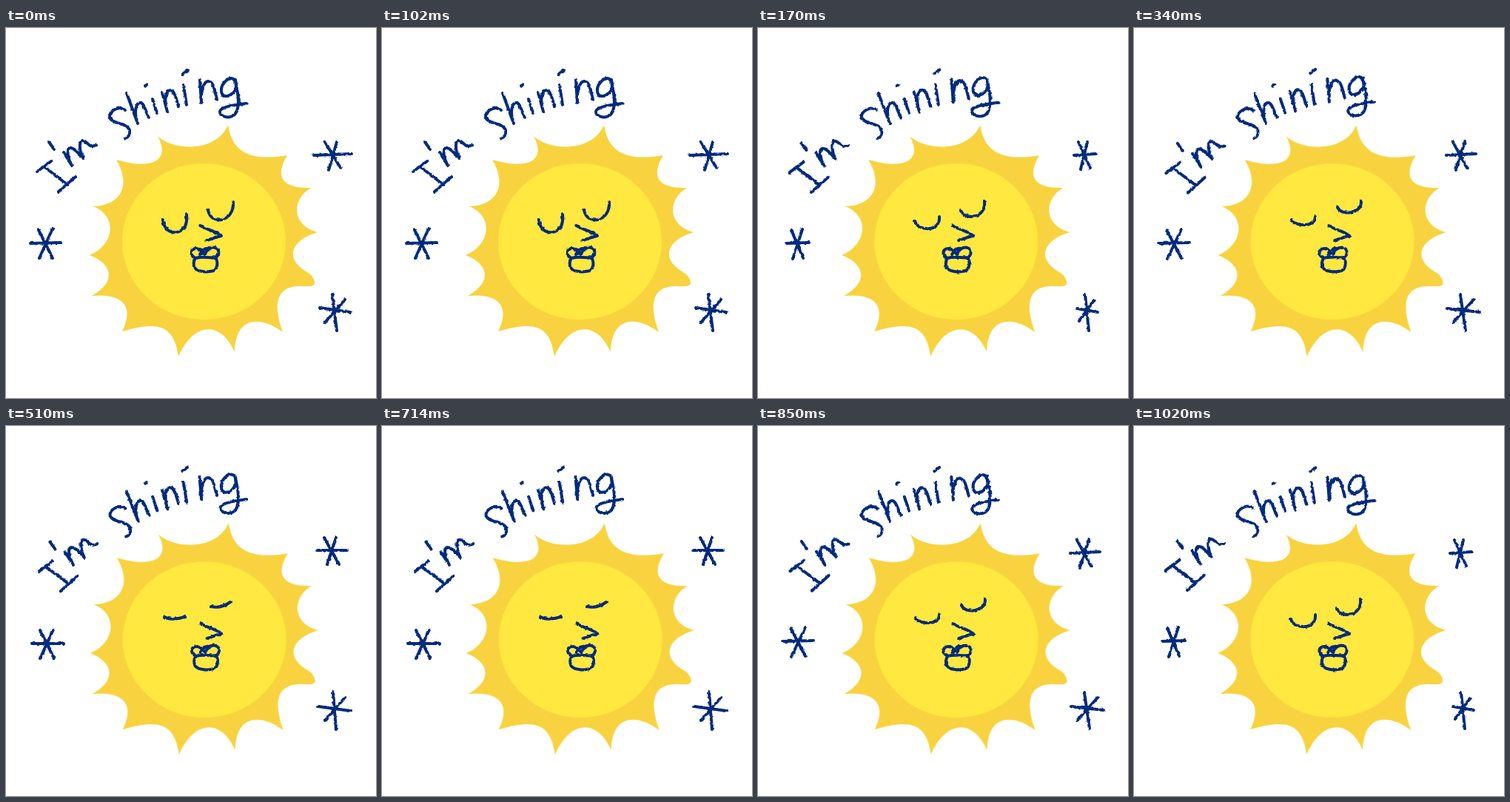
An HTML page that plays this animation: 500x500 px, repeating every 1.12 s.

```html
<!DOCTYPE html>
<html lang="en">
<head>
<meta charset="utf-8">
<title>I'm shining</title>
<style>
  html, body { margin: 0; width: 100%; height: 100%; overflow: hidden; background: #fff; }
  svg { display: block; width: 100vw; height: 100vh; }
  .ink { fill: none; stroke: #04297b; stroke-width: 4; stroke-linecap: round; stroke-linejoin: round; }
  .pose { visibility: hidden; animation: 1120ms step-end infinite; }
  #open { animation-name: open; }
  #soft { animation-name: soft; }
  #low { animation-name: low; }
  #shut { animation-name: shut; }
  #sun { animation: drift 1120ms step-end infinite; }
  @keyframes open { 0% { visibility: visible } 15.1786%, 100% { visibility: hidden } }
  @keyframes soft {
    0% { visibility: hidden } 15.1786% { visibility: visible }
    30.3571% { visibility: hidden } 91.0714%, 100% { visibility: visible }
  }
  @keyframes low {
    0% { visibility: hidden } 30.3571% { visibility: visible } 45.5357% { visibility: hidden }
    75.8929% { visibility: visible } 91.0714%, 100% { visibility: hidden }
  }
  @keyframes shut {
    0% { visibility: hidden } 45.5357% { visibility: visible } 75.8929%, 100% { visibility: hidden }
  }
  @keyframes drift {
    0% { transform: translate(0, 0) } 15.1786% { transform: translate(.2px, 0) }
    30.3571%, 75.8929% { transform: translate(.6px, .1px) }
    45.5357% { transform: translate(.7px, .1px) }
    91.0714%, 100% { transform: translate(.2px, 0) }
  }
</style>
</head>
<body>
<svg viewBox="0 0 500 500" role="img" aria-label="I'm shining">
  <defs>
    <g id="words">
      <path d="M42 194L61 180M51 187L82 211M71 221L94 201M58 154L65 164"/>
      <path d="M78 168L89 186C82 172 82 162 87 162C93 162 98 170 104 176C98 162 99 152 104 152C110 153 112 163 122 158"/>
      <path d="M161 111C152 104 139 113 140 120C142 130 163 127 167 138C168 144 165 148 161 149"/>
      <path d="M163 88L178 129C172 113 176 100 182 101C187 102 189 114 193 121"/>
      <path d="M198 96L204 115M188 78L190 77"/>
      <path d="M211 87L218 113C213 97 216 84 222 84C228 84 230 96 233 106"/>
      <path d="M240 77L244 104M239 62L246 57"/>
      <path d="M262 70L264 101C263 83 268 71 274 72C281 73 282 86 285 96"/>
      <path d="M310 71C303 62 290 75 291 86C293 97 307 92 311 80L310 70C313 87 316 101 312 112C307 125 289 121 289 113C290 106 309 104 325 102"/>
    </g>
    <g id="mouth">
      <path d="M263 267C271 273 283 274 291 281C284 282 278 285 271 287"/>
      <path d="M256 311C247 306 250 298 257 298C263 298 265 303 269 306C270 300 277 295 283 297C290 300 288 308 282 311"/>
      <path d="M262 306C266 299 270 297 274 298M256 311C265 308 274 311 283 310C287 316 286 326 280 328C270 331 256 329 254 322C253 317 254 314 256 311"/>
    </g>
  </defs>
  <g id="sun">
    <path fill="#f8d33f" d="M300 131C305 162 322 182 380 172C364 199 370 217 412 216C385 232 386 267 421 276C384 287 376 312 407 330C414 334 417 340 417 345C416 350 408 349 402 349C367 347 359 369 374 411C350 392 310 384 309 438C291 396 254 396 233 444C227 401 206 396 157 410C174 376 158 358 116 362C148 344 146 320 113 307C147 293 151 254 118 241C155 240 170 213 149 178C197 192 223 180 205 146C225 166 284 169 300 131Z"/>
    <ellipse cx="267.5" cy="288.5" rx="110.5" ry="105.5" fill="#ffe83f"/>
  </g>
</svg>
<script>
const svg = document.querySelector('svg');

// tilt of the lettering, eyes, and stars as [x1, y1, x2, y2] strokes
const poses = {
  open: {
    tilt: 0, shift: 0,
    eyes: 'M212 259C214 284 248 282 244 252M273 246C277 268 309 262 307 235',
    stars: [[416,172,467,170], [431,154,452,189], [447,154,436,192],
            [33,291,74,290], [44,273,63,311], [63,271,45,311],
            [424,378,465,384], [441,360,447,409], [458,367,431,398]]
  },
  soft: {
    tilt: -.5, shift: .2,
    eyes: 'M212 261C216 275 247 276 245 255M274 246C278 261 309 257 306 234',
    stars: [[427,172,456,170], [433,154,449,189], [445,154,436,191],
            [38,291,69,290], [45,273,61,311], [60,272,47,312],
            [431,379,459,384], [442,360,447,409], [454,368,434,396]]
  },
  low: {
    tilt: -.9, shift: .5,
    eyes: 'M213 259C217 268 245 270 245 255M275 242C279 254 308 252 307 234',
    stars: [[422,172,462,170], [431,154,450,189], [447,154,435,191],
            [33,291,75,290], [44,273,64,311], [64,272,45,312],
            [423,379,467,384], [441,360,448,409], [459,367,431,398]]
  },
  shut: {
    tilt: -1.2, shift: 1,
    eyes: 'M214 258C222 263 234 260 242 258M277 244C286 246 296 243 303 238',
    stars: [[421,168,461,168], [430,151,450,187], [446,151,434,187],
            [35,294,78,294], [46,276,65,314], [64,275,46,314],
            [422,379,466,385], [442,360,446,410], [458,367,431,398]]
  }
};

const line = ([a, b, c, d]) => `M${a} ${b}L${c} ${d}`;

svg.insertAdjacentHTML('beforeend', Object.entries(poses).map(([id, p], i) => `
  <filter id="rough-${id}" filterUnits="userSpaceOnUse" x="0" y="0" width="500" height="500">
    <feTurbulence type="fractalNoise" baseFrequency=".22" numOctaves="2" seed="${i + 3}"/>
    <feDisplacementMap in="SourceGraphic" scale="3.2" xChannelSelector="R" yChannelSelector="G"/>
  </filter>
  <g id="${id}" class="pose ink" filter="url(#rough-${id})">
    <use href="#words" transform="translate(${p.shift} 0) rotate(${p.tilt} 180 140)"/>
    <use href="#mouth" x="${p.shift * .6}"/>
    <path d="${p.eyes}"/>
    <path d="${p.stars.map(line).join('')}"/>
  </g>`).join(''));
</script>
</body>
</html>
```
